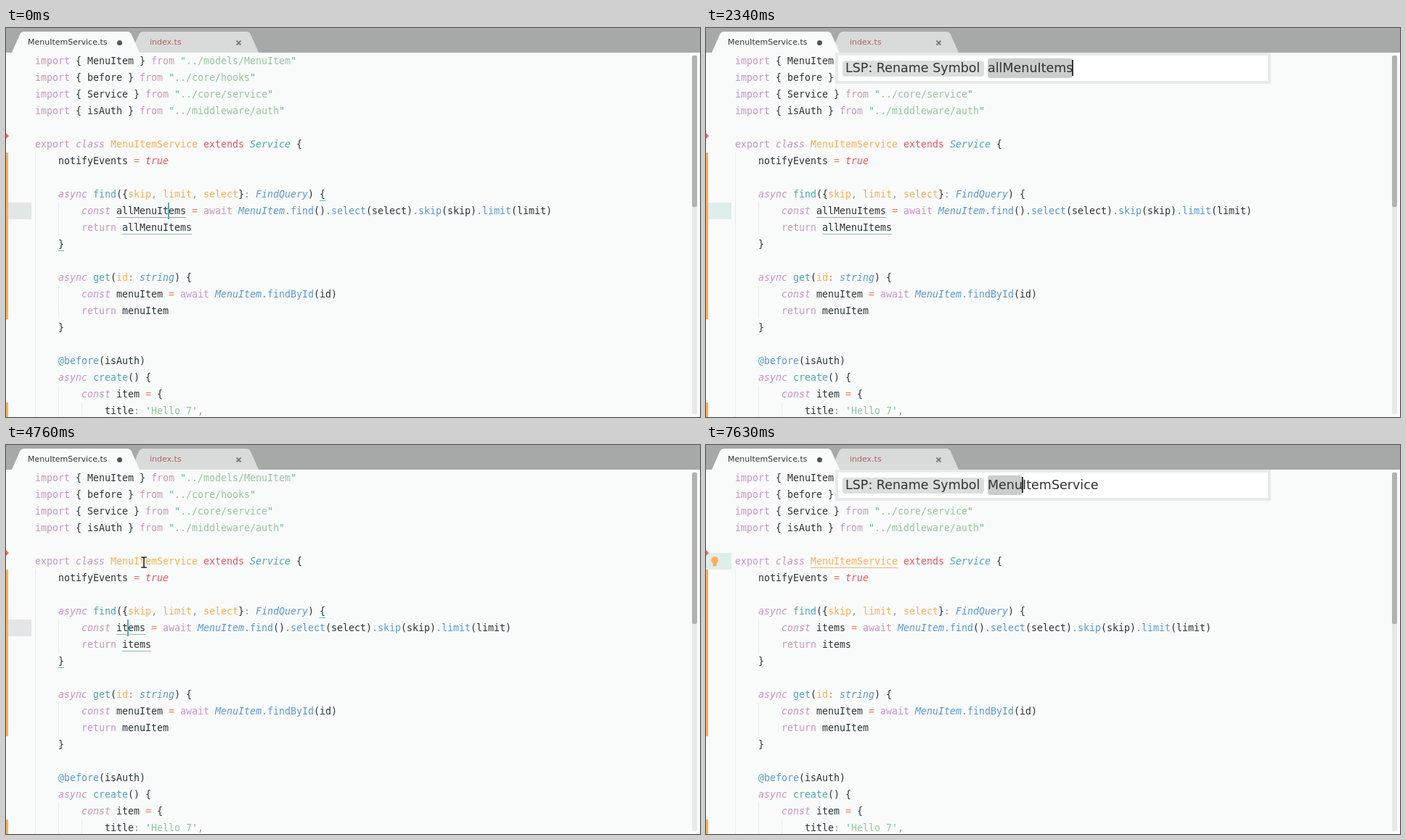
Animation, 956 px wide and 537 px high, one loop 8 s. Source, as an HTML page with a canvas:

```html
<!DOCTYPE html>
<html lang="en">
<head>
<meta charset="utf-8">
<title>Rename symbol</title>
<style>
  html, body { margin: 0; width: 100%; height: 100%; overflow: hidden; background: #f9fbfa; }
  canvas { display: block; }
</style>
</head>
<body>
<canvas width="956" height="537"></canvas>
<script>
const ctx = document.querySelector('canvas').getContext('2d');
const LOOP = 8000, LEFT = 40, TOP = 34, CHAR = 8, LINE = 23;
const MONO = '13.3px "DejaVu Sans Mono", monospace';
const SANS = 'px "DejaVu Sans", sans-serif';

const colors = {
  f: '#2b3338', p: '#c695c6', o: '#f9ae58', r: '#e4565e', x: '#f0785c',
  t: '#4fa5b3', b: '#5c97cf', s: '#92c69c', q: '#5fb4a4', g: '#9a9a9a'
};

// "~k" sets the colour for the text after it; a capital key means italic.
const importLine = (name, path) => `~pimport ~f{ ${name} } ~pfrom ~q"~s${path}~q"`;
const codeLines = name => [
  importLine('MenuItem', '../models/MenuItem'),
  importLine('before', '../core/hooks'),
  importLine('Service', '../core/service'),
  importLine('isAuth', '../middleware/auth'),
  '',
  '~pexport ~Pclass ~oMenuItemService ~rextends ~TService ~f{',
  '~f    notifyEvents ~x= ~Rtrue',
  '',
  '~P    async ~tfind~f({~oskip~g, ~olimit~g, ~oselect~f}~g: ~BFindQuery~f) {',
  `~P        const ~f${name} ~x= ~pawait ~BMenuItem~t.~bfind~f()~t.~bselect~f(select)~t.~bskip~f(skip)~t.~blimit~f(limit)`,
  `~p        return ~f${name}`,
  '~f    }',
  '',
  '~P    async ~tget~f(~oid~x: ~Bstring~f) {',
  '~P        const ~fmenuItem ~x= ~pawait ~BMenuItem~t.~bfindById~f(id)',
  '~p        return ~fmenuItem',
  '~f    }',
  '',
  '~t    @~bbefore~f(isAuth)',
  '~P    async ~tcreate~f() {',
  '~P        const ~fitem ~x= ~f{',
  "~f            title~g: ~q'~sHello 7~q'~g,"
];

// Mouse paths: [time, x, y]; the pointer is hidden outside each path.
const paths = [
  [[340, 520, 389], [880, 214, 262], [1110, 226, 258], [1440, 233, 258], [1740, 435, 137], [1920, 435, 137]],
  [[4130, 396, 148], [4750, 190, 162], [4910, 184, 160], [5250, 190, 159], [5530, 362, 125],
   [5760, 433, 88], [6420, 433, 88], [6500, 433, 18], [6850, 433, 18]]
];

// Rename field: [time, text, selected characters, caret index]
const fieldStates = [
  [1920, 'allMenuItems', 12, 12],
  ...[2740, 2860, 2980, 3130, 3290].map((t, i) => [t, 'items'.slice(0, i + 1), 0, i + 1]),
  [3580, null],
  [6050, 'MenuItemService', 15, 15],
  ...[6850, 7160, 7310, 7450, 7630].map((t, i) => [t, 'MenuItemService', i, i])
];

const clamp = v => Math.max(0, Math.min(1, v));
const rowTop = row => TOP + row * LINE;
const colX = col => LEFT + col * CHAR;

function rect(color, x, y, w, h, radius = 0) {
  ctx.fillStyle = color;
  ctx.beginPath();
  ctx.roundRect(x, y, w, h, radius);
  ctx.fill();
}

function text(str, x, y, color, font) {
  ctx.font = font;
  ctx.fillStyle = color;
  ctx.fillText(str, x, y);
}

function underline(row, col, length, color) {
  rect(color, colX(col), rowTop(row) + 20, length * CHAR, 1);
}

function drawCode(name) {
  codeLines(name).forEach((line, row) => {
    let col = 0;
    for (const part of line.split('~').slice(1)) {
      const key = part[0], str = part.slice(1), italic = key < 'a';
      text(str, colX(col), rowTop(row) + 16, colors[key.toLowerCase()], (italic ? 'italic ' : '') + MONO);
      col += str.length;
    }
  });
}

function drawGuides() {
  for (const [col, from, to] of [[0, 6, 22], [4, 9, 11], [4, 14, 16], [4, 20, 22], [8, 21, 22]])
    for (let y = rowTop(from); y < Math.min(537, rowTop(to)); y += 2)
      rect('#dcdfde', colX(col), y, 1, 1);
}

function drawGutter(row, tint, bulb) {
  const mix = (a, b) => Math.round(a + (b - a) * tint);
  rect(`rgb(${mix(226, 224)},${mix(230, 237)},${mix(233, 237)})`, 0, rowTop(row), 35, LINE);
  rect('#fbae58', 0, 172, 3, 230);
  rect('#fbae58', 0, 517, 3, 20);
  ctx.fillStyle = '#ec6a60';
  ctx.beginPath();
  ctx.moveTo(0, 145);
  ctx.lineTo(4, 149);
  ctx.lineTo(0, 153);
  ctx.fill();
  if (bulb) {
    rect('#fbae58', 7, 154, 10, 10, 5);
    rect('#fbae58', 9.5, 162, 5, 5.5, 1.5);
  }
}

function tabShape(x, color) {
  ctx.fillStyle = color;
  ctx.beginPath();
  ctx.moveTo(x, 34);
  ctx.lineTo(x + 11, 9);
  ctx.quadraticCurveTo(x + 13, 5, x + 17, 5);
  ctx.lineTo(x + 159, 5);
  ctx.quadraticCurveTo(x + 163, 5, x + 165, 9);
  ctx.lineTo(x + 176, 34);
  ctx.fill();
}

function drawTabs() {
  rect('#a7a9a8', 0, 0, 956, TOP);
  tabShape(172, '#d9dbda');
  tabShape(8, '#f9fbfa');
  text('MenuItemService.ts', 30, 23, '#333', 11 + SANS);
  text('index.ts', 198, 23, '#aa655f', 11 + SANS);
  rect('#555', 153, 17, 7, 7, 3.5);
  ctx.strokeStyle = '#7c7e7d';
  ctx.lineWidth = 2;
  ctx.beginPath();
  ctx.moveTo(317.5, 17.5);
  ctx.lineTo(323.5, 23.5);
  ctx.moveTo(323.5, 17.5);
  ctx.lineTo(317.5, 23.5);
  ctx.stroke();
}

function drawField([, value, selected, caret]) {
  const font = 17.5 + SANS, x = 388;
  rect('#e8eaea', 178, TOP, 600, 43);
  rect('#fff', 182, 38, 592, 35);
  rect('#dcdddd', 188, 45, 195, 22, 4);
  text('LSP: Rename Symbol', 192, 61, '#333', font);
  const width = n => ctx.measureText(value.slice(0, n)).width;
  if (selected) rect('#cbcccc', x, 42, width(selected), 27, 4);
  text(value, x, 61, '#333', font);
  rect('#333', Math.round(x + width(caret)) - 1, 44, 2, 22);
}

function drawPointer(t) {
  const path = paths.find(p => t >= p[0][0] && t < p.at(-1)[0]);
  if (!path) return;
  const i = path.findIndex(k => k[0] > t);
  const [t0, x0, y0] = path[i - 1], [t1, x1, y1] = path[i];
  const u = (t - t0) / (t1 - t0);
  ctx.save();
  ctx.translate(Math.round(x0 + (x1 - x0) * u), Math.round(y0 + (y1 - y0) * u));
  ctx.beginPath();
  for (const side of [-1, 1]) {
    ctx.moveTo(-3, side * 7);
    ctx.lineTo(3, side * 7);
  }
  ctx.moveTo(0, -7);
  ctx.lineTo(0, 7);
  ctx.lineCap = 'square';
  for (const [color, width] of [['#fff', 3.4], ['#222', 1.6]]) {
    ctx.strokeStyle = color;
    ctx.lineWidth = width;
    ctx.stroke();
  }
  ctx.restore();
}

function draw(t) {
  const renamed = t >= 3680, onClass = t >= 4960;
  const name = renamed ? 'items' : 'allMenuItems';
  const field = fieldStates.findLast(s => s[0] <= t);
  const open = field && field[1] !== null;
  const tint = t < 3580 ? clamp((t - 1920) / 400) : t < 3840 ? clamp((3780 - t) / 200) : clamp((t - 6050) / 350);

  rect('#f9fbfa', 0, 0, 956, 537);
  drawGutter(onClass ? 5 : 9, tint, t >= 5810);
  drawGuides();
  drawCode(name);

  if (t < 4910) {
    underline(9, 14, name.length, renamed ? '#8cc497' : '#9ba39f');
    underline(10, 15, name.length, '#8cc497');
  }
  if (t >= 5200) underline(5, 13, 15, '#eeb477');
  if (!open) {
    if (!onClass) {
      underline(8, 49, 1, '#5fb4b4');
      underline(11, 4, 1, '#5fb4b4');
    }
    const [row, col] = onClass ? [5, 18] : [9, renamed ? 16 : 23];
    rect('#5fa9b4', colX(col) - 1, rowTop(row), 2, LINE);
  }

  rect('#e7e9e8', 945, 38, 7, 495, 2);
  rect('#b1b3b2', 945, 38, 7, 209, 2);
  drawTabs();
  if (open) drawField(field);
  drawPointer(t);
}

const start = performance.now();
function frame() {
  draw((performance.now() - start) % LOOP);
  requestAnimationFrame(frame);
}
frame();
</script>
</body>
</html>
```
